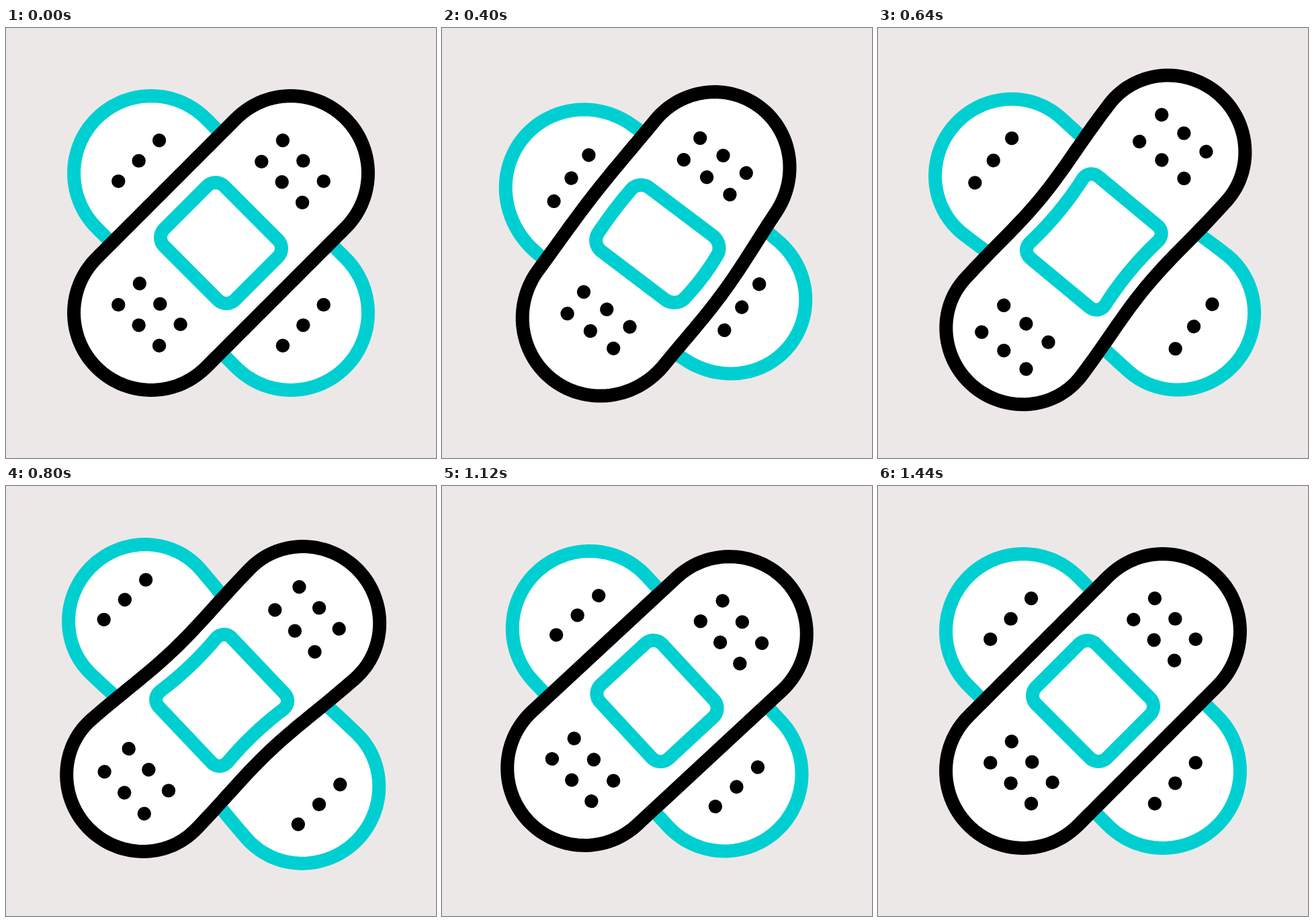
Recreate the animation shown at these times as an HTML page with a canvas. Size 640 by 640 pixels, loop 1.48 s.

```html
<!DOCTYPE html>
<html lang="en">
<head>
<meta charset="utf-8">
<title>Bandage</title>
<style>
  html, body { margin: 0; width: 100%; height: 100%; overflow: hidden; background: #ece8e7; }
  canvas { display: block; width: 100vmin; height: 100vmin; }
</style>
</head>
<body>
<canvas id="stage" width="640" height="640"></canvas>
<script>
const ctx = document.getElementById('stage').getContext('2d');
const LOOP = 1480, STEP = 40, LAG = 160;
const BLACK = '#000', TEAL = '#00cfd2', PAPER = '#ece8e7';

// [time, value] pairs, eased in and out between neighbours
const TILT = [[0, 0], [500, 8.8], [900, -3.4], [1440, 0]];
const STRETCH = [[40, 1], [320, 0.9], [350, 0.9], [560, 1.225], [710, 1.205], [990, 1]];

function track(keys, t) {
  if (t <= keys[0][0]) return keys[0][1];
  for (let i = 1; i < keys.length; i++) {
    const [t0, a] = keys[i - 1], [t1, b] = keys[i];
    if (t < t1) {
      const x = (t - t0) / (t1 - t0);
      return a + (b - a) * x * x * (3 - 2 * x);
    }
  }
  return keys[keys.length - 1][1];
}

function arc(points, cx, cy, r, from, to, steps) {
  for (let i = 0; i <= steps; i++) {
    const a = (from + (to - from) * i / steps) * Math.PI / 180;
    points.push([cx + r * Math.cos(a), cy + r * Math.sin(a)]);
  }
}

function line(points, x0, y0, x1, y1) {
  const n = 40;
  for (let i = 1; i < n; i++) {
    points.push([x0 + (x1 - x0) * i / n, y0 + (y1 - y0) * i / n]);
  }
}

// Widens or narrows a shape along its length; a swelling leans to the positive side
function shape(points, swellAt, color) {
  ctx.beginPath();
  for (const [u, v] of points) {
    const swell = swellAt(u);
    const lean = swell > 0 ? 1 + 0.3 * Math.sign(v) : 1;
    ctx.lineTo(u, v * (1 + swell * lean));
  }
  ctx.closePath();
  ctx.fillStyle = '#fff';
  ctx.fill();
  ctx.strokeStyle = color;
  ctx.stroke();
}

function drawBody(d, bow, color) {
  const half = 147 + (d > 0 ? 102 : 95) * d;
  const shift = (d > 0 ? 28 : -16) * d;
  const right = half + shift, left = shift - half;
  const rLeft = 115, rRight = 115 + 75 * Math.min(0, d);
  const points = [];
  arc(points, right, 0, rRight, -90, 90, 60);
  line(points, right, rRight, left, rLeft);
  arc(points, left, 0, rLeft, 90, 270, 60);
  line(points, left, -rLeft, right, -rRight);
  shape(points, u => bow / 115 * Math.exp(-((u / 125) ** 2)), color);
}

function drawPad(d, bow) {
  const r = 18, mid = 10 * d;
  const hu = 63.2 + 74 * d, hv = 74.6;
  const x0 = mid - hu + r, x1 = mid + hu - r, y = hv - r;
  const points = [];
  arc(points, x1, y, r, 0, 90, 12);
  line(points, x1, hv, x0, hv);
  arc(points, x0, y, r, 90, 180, 12);
  arc(points, x0, -y, r, 180, 270, 12);
  line(points, x0, -hv, x1, -hv);
  arc(points, x1, -y, r, 270, 360, 12);
  const base = bow > 0 ? 1 : 0.45;
  shape(points, u => bow / hv * (base - 0.5 * ((u - mid) / hu) ** 2), TEAL);
}

function drawDots(u) {
  ctx.fillStyle = BLACK;
  for (const v of [-43, 0, 43]) {
    ctx.beginPath();
    ctx.arc(u, v, 10.2, 0, 2 * Math.PI);
    ctx.fill();
  }
}

function drawBandage(t, degrees, front) {
  const d = track(STRETCH, t) - 1;
  const bow = d > 0 ? -14 * Math.tanh(7 * d) : -145 * d;
  const outer = 173 * (1 + d);
  const inner = 128.3 + (d > 0 ? 140 : 92) * d;
  const mid = 10 * d;

  ctx.save();
  ctx.translate(320, 320);
  ctx.rotate(degrees * Math.PI / 180);
  ctx.lineWidth = 20;
  drawBody(d, bow, front ? BLACK : TEAL);
  for (const side of [-1, 1]) {
    drawDots(mid + side * outer);
    if (front) drawDots(mid + side * inner);
  }
  if (front) drawPad(d, bow);
  ctx.restore();
}

function draw(now) {
  const t = Math.floor(now % LOOP / STEP) * STEP;
  const tilt = track(TILT, t);
  ctx.fillStyle = PAPER;
  ctx.fillRect(0, 0, 640, 640);
  drawBandage(t - LAG, 45 - tilt, false);
  drawBandage(t, -45 - tilt, true);
}

const start = performance.now();
function loop() {
  draw(performance.now() - start);
  requestAnimationFrame(loop);
}
loop();
</script>
</body>
</html>
```
